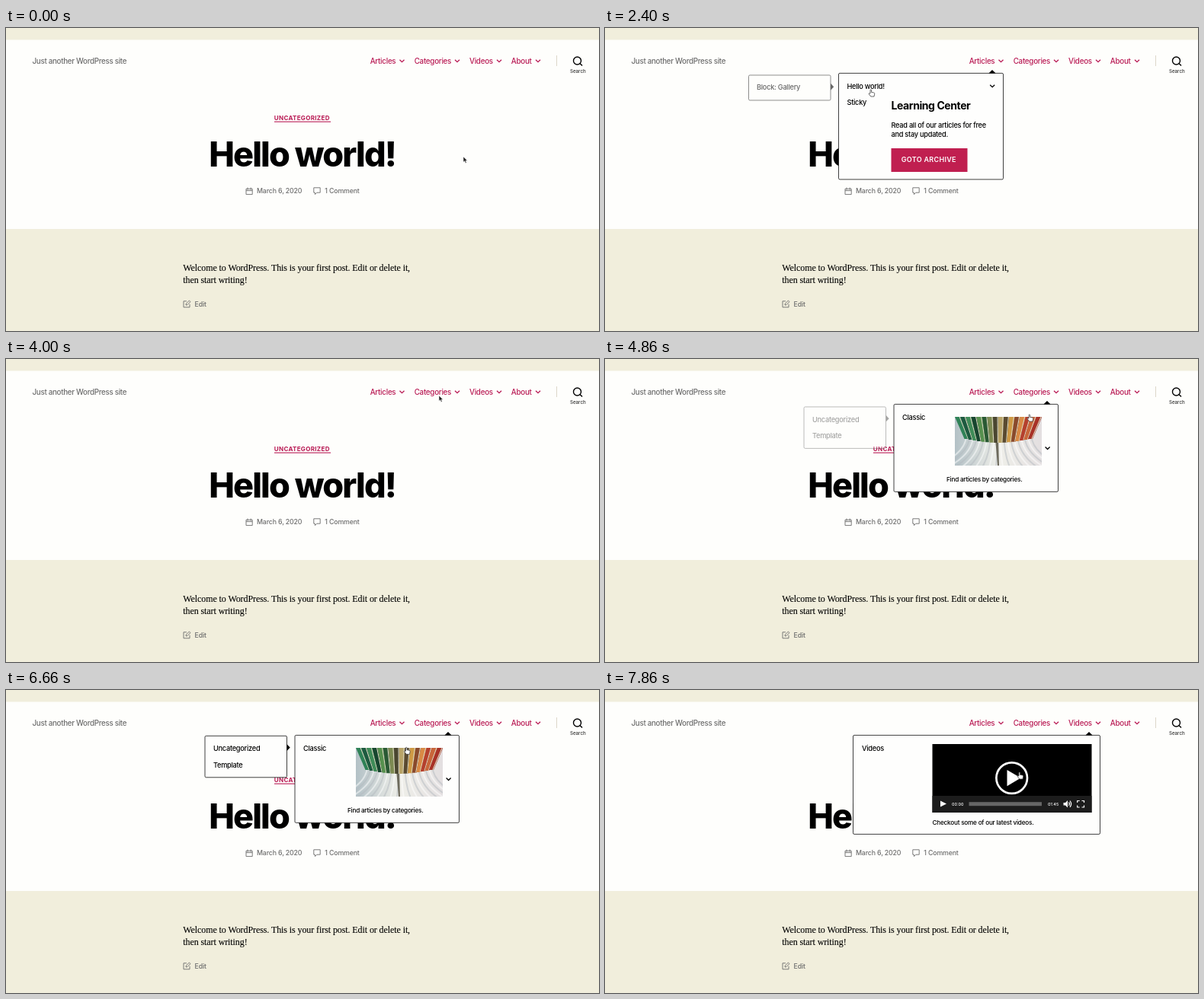
Write an HTML page that moves like this. It is 778 px wide and 398 px high and loops after 8 s.

```html
<!DOCTYPE html>
<html lang="en">
<head>
<meta charset="utf-8">
<title>Mega menu</title>
<style>
html, body { margin: 0; width: 100%; height: 100%; overflow: hidden; background: #f1eedc; }
svg { display: block; }
text { font: 500 9.8px Inter, sans-serif; font-optical-sizing: none; letter-spacing: -.0277em; white-space: pre; }
.desc { letter-spacing: -.0311em; fill: #6d6d6d; }
.nav { fill: #b91a54; }
.search { font-size: 6.2px; letter-spacing: 0; fill: #333; }
.cat { font-size: 8.05px; font-weight: 700; letter-spacing: .0366em; fill: #b91a54; }
.title { font-size: 45px; font-weight: 800; letter-spacing: -.0415em; }
.meta { font-size: 8.77px; letter-spacing: -.016em; fill: #6d6d6d; }
.body { font: 12px "Liberation Serif", serif; letter-spacing: -.09px; stroke: #000; stroke-width: .1; }
.item { font-size: 9.2px; }
.head { font-size: 14px; font-weight: 700; letter-spacing: -.03em; }
.button { font-size: 9px; font-weight: 600; letter-spacing: .0333em; fill: #fff; }
.note { font-size: 8.2px; }
.time { font-size: 5.4px; letter-spacing: 0; fill: #fff; }
.line { fill: none; stroke: #6d6d6d; stroke-width: .9; }
.hover { text-decoration: underline; }
</style>
</head>
<body>
<svg id="stage" width="778" height="398" viewBox="0 0 778 398"></svg>
<script>
const text = (x, y, cls, s, more = '') => `<text x="${x}" y="${y}" class="${cls}" ${more}>${s}</text>`;
const rect = (x, y, w, h, fill, more = '') =>
  `<rect x="${x}" y="${y}" width="${w}" height="${h}" fill="${fill}" ${more}/>`;
const path = (d, more = '') => `<path d="${d}" ${more}/>`;
const chevron = (x, y, color) =>
  path(`M${x - 3} ${y - 1.5}l3 3 3-3`, `fill="none" stroke="${color}" stroke-width="1.3"`);
const box = (x, y, w, h) => rect(x, y, w, h, '#fefefd', 'rx="1.6" stroke="#000" stroke-width=".75"');
const menu = (id, tip, x, w, h, inner) =>
  `<g id="${id}">${box(x, 59.4, w, h)}${path(`M${tip - 4.6} 59.4l4.6-4.4 4.6 4.4z`)}${inner}</g>`;
const side = (id, x, w, h, inner) =>
  `<g id="${id}">${box(x, 60.3, w, h)}${path(`M${x + w} 71.2l4.2 4.4-4.2 4.4z`)}${inner}</g>`;

const links = [
  ['Articles', 477.7, 519.5], ['Categories', 535.7, 592], ['Videos', 608, 647], ['About', 662.8, 698]
];

// A row of upright books: coloured covers above, pale pages below
function books() {
  const covers = ['#2f8257', '#1d5a40', '#3f8c58', '#17462f', '#57914f', '#2a5a34', '#7d8a52',
    '#4a4630', '#b9a468', '#5a4a30', '#cf9a45', '#8a4a2c', '#d98a45', '#b5402e', '#c9663a', '#a83228'];
  let s = rect(459, 76, 114, 64, 'url(#pages)');
  for (let i = 0; i < 20; i++) {
    const x = 432 + i * 9;
    s += path(`M${x} 142Q${(x + 516) / 2} 124 ${516 + (x - 516) * .5} 100`,
      `fill="none" stroke="${i % 2 ? '#b4b9c0' : '#fff'}" stroke-width="2" opacity=".5"`);
  }
  s += path('M512 104l3 36h2l-1-36z', 'fill="#6d6a5c"');
  covers.forEach((c, i) => {
    const x = 459 + i * 7.125, low = x + (516 - x) * .22, y = 105 + 5 * Math.sin(i / 15 * Math.PI);
    s += path(`M${x} 76h7.4L${low + 6} ${y}h-6z`, `fill="${c}"`);
    s += path(`M${x + 6.2} 76L${low + 5} ${y}`, 'stroke="#d9d5bd" stroke-width="1.1"');
  });
  return `<g clip-path="url(#photo)">${s}</g>`;
}

const page =
  rect(0, 0, 778, 398, '#f1eedc') + rect(0, 15.5, 778, 248.5, '#fefefc') +
  text(34.5, 46.5, 'desc', 'Just another WordPress site') +
  links.map(([s, x, c], i) => text(x, 46.5, 'nav', s, `id="link${i}"`) + chevron(c, 43.2, '#b91a54')).join('') +
  rect(722, 36, 1, 14, '#dcd7ca') +
  '<circle cx="749.5" cy="43" r="5" fill="none" stroke="#000" stroke-width="1.4"/>' +
  path('M753 46.5l3 3', 'stroke="#000" stroke-width="1.4"') +
  text(750.3, 59.4, 'search', 'Search', 'text-anchor="middle"') +
  text(351.8, 120.8, 'cat', 'UNCATEGORIZED') + rect(352, 122.6, 74, 1.1, '#b91a54') +
  text(388.6, 182.2, 'title', 'Hello world!', 'text-anchor="middle"') +
  path('M315 211.3h8.2v7.3h-8.2zM315 213.6h8.2M317 209.5v3M321.2 209.5v3', 'class="line"') +
  text(329, 217.3, 'meta', 'March 6, 2020') +
  path('M403.8 209.8h8.4v6.4h-4.4l-2.4 2.4v-2.4h-1.6z', 'class="line"') +
  text(418.3, 217.3, 'meta', '1 Comment') +
  text(232.3, 318.8, 'body', 'Welcome to WordPress. This is your first post. Edit or delete it,') +
  text(232.3, 335.2, 'body', 'then start writing!') +
  path('M237 358.8h-4v8h8v-4M236 364l.4-2 4-4 1.6 1.6-4 4z', 'class="line"') +
  text(247.5, 365.6, 'meta', 'Edit');

const menus =
  menu('articles', 508, 306.5, 216, 139.5,
    text(317.5, 79.6, 'item', 'Hello world!') + text(317.5, 101.2, 'item', 'Sticky') +
    chevron(508.2, 76.2, '#000') + text(375.5, 106.6, 'head', 'Learning Center') +
    text(375.5, 131.4, 'item', 'Read all of our articles for free') +
    text(375.5, 143.3, 'item', 'and stay updated.') +
    rect(375.5, 158, 100, 31, '#c01f50') + text(388.8, 176.3, 'button', 'GOTO ARCHIVE')) +
  side('gallery', 188.5, 107.5, 33, text(199, 79.8, 'item', 'Block: Gallery')) +
  menu('categories', 580, 379, 215.5, 115,
    text(390, 79.6, 'item', 'Classic') + books() + chevron(580.6, 117, '#000') +
    text(448, 161.4, 'note', 'Find articles by categories.')) +
  side('template', 261, 107.5, 54.5,
    text(272, 80, 'item', 'Uncategorized') + text(272, 101.7, 'item', 'Template')) +
  menu('videos', 635, 325.5, 324, 130,
    text(337, 79.6, 'item', 'Videos') + rect(429.5, 71, 209, 90, '#000') +
    rect(429.5, 139, 209, 22, '#1c1c1c') +
    '<circle cx="533.7" cy="115.6" r="20.3" fill="none" stroke="#fff" stroke-width="2.7"/>' +
    path('M527.5 105l18 10.6-18 10.6zM440 145.5l8 4-8 4z', 'fill="#fff"') +
    text(455, 151.7, 'time', '00:00') + rect(477.5, 147.2, 95.5, 5, '#666') +
    text(581, 151.7, 'time', '01:45') +
    path('M601.5 148h2.5l3-3v9.5l-3-3h-2.5z', 'fill="#fff"') +
    path('M608.5 147.5q1.8 2.2 0 4.4M610 145.5q3.2 4.2 0 8.4M619.7 148v-2.5h3M625.5 145.5h3v2.5M628.5 151.5v2.5h-3M622.7 154h-3v-2.5',
      'fill="none" stroke="#fff" stroke-width="1.2"') +
    text(429.5, 177.4, 'note', 'Checkout some of our latest videos.'));

const cursors =
  path('M0 0v7.2l1.7-1.5 1.2 2.7 1.3-.6-1.2-2.6h2.3z', 'id="arrow" fill="#222" stroke="#fff" stroke-width=".5"') +
  path('M0 4V-.6Q.8-1.5 1.6-.6v3l3 .5q1.2.3 1.1 1.5L5 8H.8l-2.6-3.3q-.3-1.1.7-.9z',
    'id="hand" fill="#fff" stroke="#444" stroke-width=".8"');

const $ = id => document.getElementById(id);
$('stage').innerHTML =
  '<defs><clipPath id="photo"><rect x="459" y="76" width="114" height="64"/></clipPath>' +
  '<linearGradient id="pages"><stop stop-color="#b3c1c6"/><stop offset=".5" stop-color="#efefe9"/>' +
  '<stop offset="1" stop-color="#e3dfe0"/></linearGradient></defs>' +
  page + menus + cursors;

// Cursor stops: time, x, y
const stops = [
  [60, 600, 169], [480, 497, 41], [930, 497, 41], [1250, 470, 105], [1600, 430, 168],
  [1860, 430, 168], [2200, 345, 97], [2400, 348, 82], [2660, 348, 80], [3200, 348, 80],
  [3400, 430, 168], [3660, 430, 168], [3820, 545, 112], [4000, 568, 48], [4240, 560, 40],
  [4600, 560, 40], [4860, 556, 74], [5130, 552, 95], [5600, 552, 95], [6130, 459, 95],
  [6400, 330, 93], [6460, 330, 93], [6700, 540, 75], [6840, 613, 37], [7460, 613, 37], [7860, 543, 109]
];
// Opening and closing times of each panel
const spans = {
  articles: [[430, 3790]], gallery: [[1100, 2060], [2312, 3780]],
  categories: [[4090, 6792]], template: [[4808, 6690]], videos: [[6846, 9000]]
};
const ramp = v => Math.max(0, Math.min(1, v));

function cursorAt(t) {
  const i = stops.findIndex(s => s[0] > t);
  if (i < 1) return (i ? stops[stops.length - 1] : stops[0]).slice(1);
  const [a, x, y] = stops[i - 1], [b, x2, y2] = stops[i];
  let u = (t - a) / (b - a);
  u = u * u * (3 - 2 * u);
  return [x + (x2 - x) * u, y + (y2 - y) * u];
}

function draw(t) {
  for (const id in spans) {
    const o = Math.max(...spans[id].map(([a, b]) => ramp((t - a) / 150) * (1 - ramp((t - b) / 150))));
    $(id).setAttribute('opacity', o);
    $(id).setAttribute('transform', `translate(0 ${4 * (1 - o)})`);
  }
  const [x, y] = cursorAt(t);
  let onLink = false;
  links.forEach(([, left, right], i) => {
    const over = y > 33 && y < 46 && x > left && x < right;
    onLink = onLink || over;
    $('link' + i).classList.toggle('hover', over);
  });
  const inside = (t > 600 && t < 3760) || (t > 4240 && t < 6760) || t > 7000;
  const shown = onLink || inside ? 'hand' : 'arrow';
  for (const id of ['hand', 'arrow']) {
    $(id).setAttribute('visibility', id === shown ? 'visible' : 'hidden');
    $(id).setAttribute('transform', `translate(${x} ${y})`);
  }
}

let start;
function tick(now) {
  start ??= now;
  draw((now - start) % 8000);
  requestAnimationFrame(tick);
}
draw(0);
requestAnimationFrame(tick);
</script>
</body>
</html>
```
